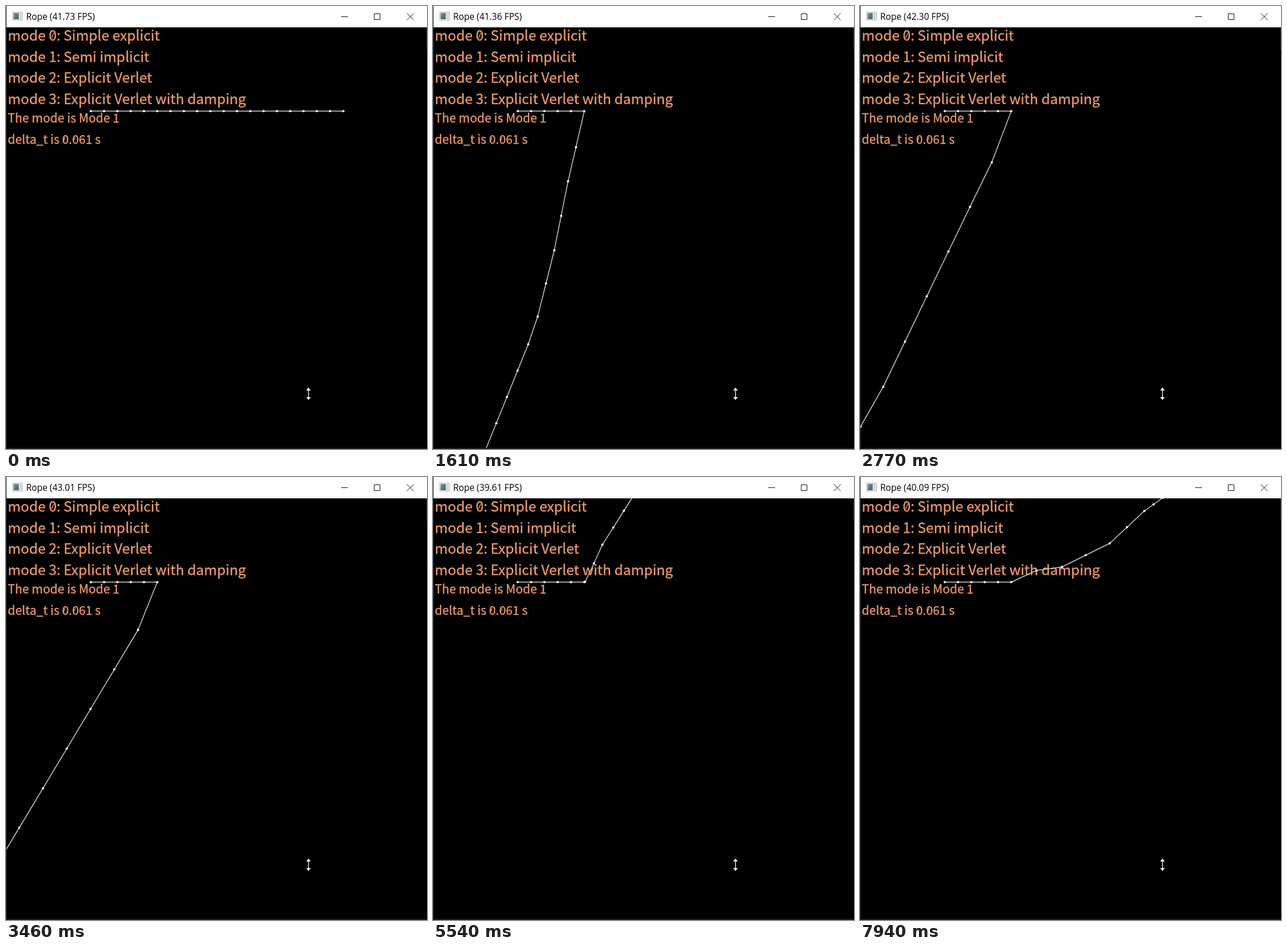
Animation, 730 px wide and 768 px high, one loop 8 s. Source, as an HTML page:

```html
<!DOCTYPE html>
<html lang="en">
<head>
<meta charset="utf-8">
<title>Rope</title>
<style>
  html, body { margin: 0; width: 100%; height: 100%; overflow: hidden; background: #000; }
  svg { display: block; width: 730px; height: 768px; }
  .title { font: 15.4px "Open Sans", "Noto Sans", sans-serif; fill: #000; }
  .osd {
    font-family: "Noto Sans CJK SC", "Noto Sans CJK JP", "Noto Sans CJK", sans-serif;
    fill: #ec996a; stroke: #ec996a; stroke-width: 0.35;
  }
  .big { font-size: 24.3px; }
  .small { font-size: 20.95px; }
  .slash { stroke-width: 1.3; }
  .line { fill: none; stroke: #c9c9c9; stroke-width: 1.5; stroke-linejoin: round; }
  .glyph { fill: none; stroke: #111; stroke-width: 1; }
</style>
</head>
<body>
<svg viewBox="0 0 730 768">
  <defs>
    <marker id="dot" markerUnits="userSpaceOnUse" markerWidth="6" markerHeight="6" refX="3" refY="3">
      <circle cx="3" cy="3" r="2" fill="#fff"/>
    </marker>
    <clipPath id="view"><rect x="1" y="37" width="729" height="729"/></clipPath>
    <linearGradient id="pane" x2="1" y2="1">
      <stop stop-color="#7d9aa0"/><stop offset="1" stop-color="#3f5a66"/>
    </linearGradient>
  </defs>
  <rect width="730" height="768" fill="#000"/>
  <rect width="1" height="768" fill="#303030"/>
  <rect y="766" width="730" height="2" fill="#1c1c1c"/>
  <rect x="729" y="37" width="1" height="39" fill="#2a2a2a"/>

  <rect x="1" width="729" height="37" fill="#fff"/>
  <rect x="11.5" y="10.5" width="17" height="14" fill="#f0f0f0" stroke="#b5b9bc"/>
  <rect x="13" y="12" width="9" height="11" fill="url(#pane)"/>
  <rect x="23" y="12" width="4" height="11" fill="#cfd4d6"/>
  <text class="title" id="title" x="35" y="24"></text>
  <path class="glyph" d="M581 18.5H593M638.5 13.5h10v10h-10zM695 12.5l12 12M707 12.5l-12 12"/>

  <g class="osd">
    <g class="big">
      <text x="3" y="60">mode 0: Simple explicit</text>
      <text x="3" y="96.5">mode 1: Semi implicit</text>
      <text x="3" y="133">mode 2: Explicit Verlet</text>
      <text x="3" y="169.5">mode 3: Explicit Verlet with damping</text>
    </g>
    <g class="small">
      <text x="3" y="202.3">The mode is Mode 1</text>
      <text x="3" y="238.8">delta_t is 0.061 s</text>
    </g>
    <path class="slash" d="M79 55.5l4 -9M99 235.5l3.500 -8M116.500 235.5l3.500 -8"/>
  </g>

  <g clip-path="url(#view)">
    <polyline class="line" id="rope" marker-start="url(#dot)" marker-mid="url(#dot)" marker-end="url(#dot)"/>
  </g>
  <path d="M524.5 664V681" stroke="#fff" stroke-width="1.3"/>
  <path d="M524.5 661.5l4 5h-8zM524.5 683l4 -5h-8z" fill="#fff"/>
</svg>
<script>
  const LOOP = 8000, STEP = 77.1, LEAD = 143, LAST = 101;
  const PINNED = 6, FREE = 14, GAP = 23.05, X0 = 147, Y0 = 182.3, DROP = 348;
  const HOOK = [0, X0 + (PINNED - 1) * GAP, Y0];
  const rope = document.getElementById('rope');
  const title = document.getElementById('title');
  const mix = (a, b, f) => a + (b - a) * f;

  // A pose is a chain bent at a few [node, x, y] points; the last bend runs on straight.
  function pose(step, fps, ...bends) {
    const k = [HOOK, ...bends];
    const nodes = Array.from({ length: FREE }, (_, i) => {
      const n = i + 1;
      let j = 0;
      while (j < k.length - 2 && n > k[j + 1][0]) j++;
      const a = k[j], b = k[j + 1], f = (n - a[0]) / (b[0] - a[0]);
      return [mix(a[1], b[1], f), mix(a[2], b[2], f)];
    });
    return { step, fps, nodes };
  }

  const poses = [
    pose(0, 41.73, [1, HOOK[1] + GAP, Y0]),
    pose(11, 40.35, [2, 270, 249], [4, 285, 318], [7, 293, 408], [11, 288, 508], [12, 306, 509], [14, 277, 530]),
    pose(26, 41.92, [1, 235, 264], [6, 99, 640], [8, 38, 760]),
    pose(43, 43.01, [1, 229, 265], [6, 23, 608]),
    pose(57, 39.90, [2, 242, 252], [4, 203, 309], [6, 180, 354], [9, 133, 413], [14, 39, 496]),
    pose(66, 39.58, [1, 256, 194], [3, 275, 147]),
    pose(83, 39.76, [2, 323, 111], [3, 346, 69], [4, 388, 39]),
    pose(LAST, 40.09, [1, 306, 162], [2, 350, 156], [4, 433, 115], [6, 493, 59], [8, 525, 36])
  ];

  function speed(i, n, axis) {
    const a = poses[i - 1] || poses[i], b = poses[i + 1] || poses[i];
    return (b.nodes[n][axis] - a.nodes[n][axis]) / (b.step - a.step);
  }

  // Cubic path between poses that keeps each node's speed continuous.
  function glide(i, f, n, axis) {
    const a = poses[i], b = poses[i + 1], d = b.step - a.step, g = 1 - f;
    return g * g * ((1 + 2 * f) * a.nodes[n][axis] + f * d * speed(i, n, axis))
      + f * f * ((3 - 2 * f) * b.nodes[n][axis] - g * d * speed(i + 1, n, axis));
  }

  // Free fall: each node drops until the rope above it is taut.
  function fall(f, n) {
    const a = poses[0].nodes[n], b = poses[1].nodes[n];
    return [mix(a[0], b[0], f * f), Math.min(b[1], Y0 + DROP * f * f)];
  }

  function draw(t) {
    const s = Math.min(LAST, Math.max(0, Math.floor((t - LEAD) / STEP)));
    let i = 0;
    while (i < poses.length - 2 && s >= poses[i + 1].step) i++;
    const a = poses[i], b = poses[i + 1];
    const f = (s - a.step) / (b.step - a.step);
    const points = Array.from({ length: PINNED }, (_, n) => [X0 + n * GAP, Y0]);
    for (let n = 0; n < FREE; n++) {
      points.push(i ? [glide(i, f, n, 0), glide(i, f, n, 1)] : fall(f, n));
    }
    rope.setAttribute('points', points.map(p => p.map(v => v.toFixed(2))).join(' '));
    const fps = mix(a.fps, b.fps, f) + 0.8 * f * (1 - f) * Math.sin(s * 7);
    title.textContent = `Rope (${fps.toFixed(2)} FPS)`;
  }

  const start = performance.now();
  function tick() {
    draw((performance.now() - start) % LOOP);
    requestAnimationFrame(tick);
  }
  draw(0);
  requestAnimationFrame(tick);
</script>
</body>
</html>
```
